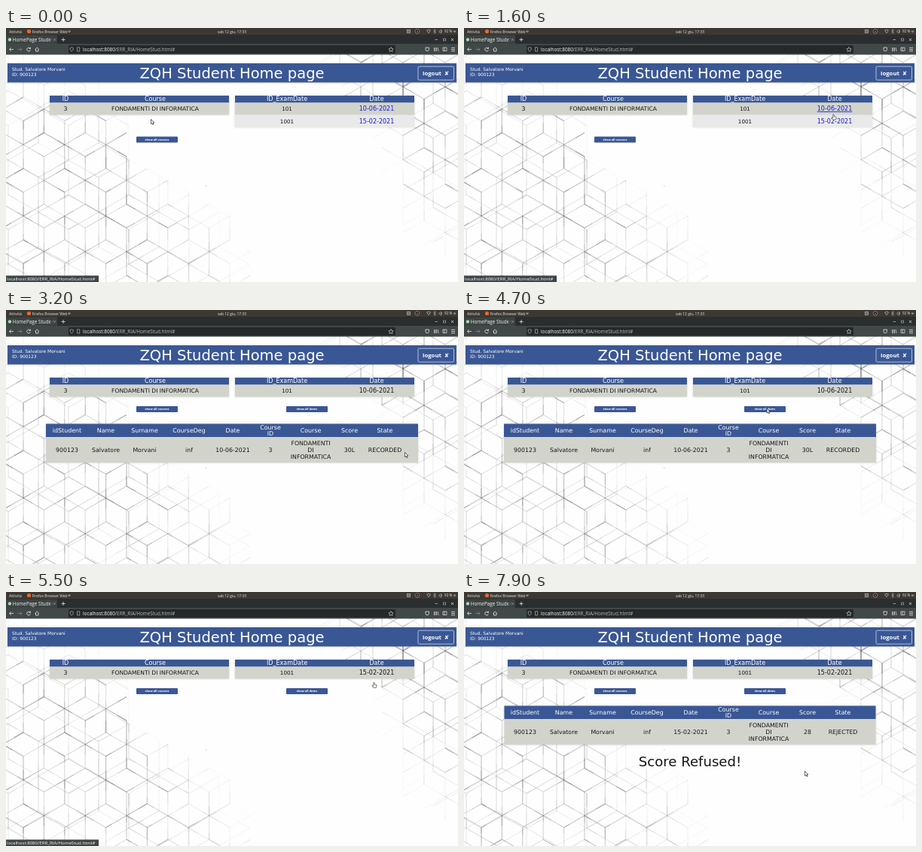
Write an HTML page that moves like this. It is 600 by 338 pixels and loops after 8 s.

```html
<!DOCTYPE html>
<html lang="it">
<head>
<meta charset="utf-8">
<title>Student Home page</title>
<style>
html, body { margin: 0; width: 100%; height: 100%; overflow: hidden; background: #fff; }
svg { display: block; width: 100vw; height: 100vh; }
text { font-family: "DejaVu Sans", sans-serif; }
.ui text, text.ui { font-family: "Open Sans", "Noto Sans", sans-serif; }
.panel { filter: drop-shadow(0 0 1.5px rgba(0, 0, 0, .16)); }
</style>
</head>
<body>
<svg id="stage" viewBox="0 0 600 338" preserveAspectRatio="none"></svg>
<script>
const LOOP = 8000, STEP = 100;
const BLUE = '#3a5795', ROW = '#d2d4cc', ROW2 = '#e9e9e9', INK = '#161616', LINK = '#1a1ad8';
const FIRST = 'Salvatore', LAST = 'Morvani', STUDENT = '900123';
const URL_HOST = 'localhost:8080', URL_PATH = '/ERR_RIA/HomeStud.html#';

const rect = (x, y, w, h, fill, more = '') =>
  `<rect x="${x}" y="${y}" width="${w}" height="${h}" fill="${fill}" ${more}/>`;
const text = (s, x, y, size, fill = INK, more = '') =>
  `<text x="${x}" y="${y}" font-size="${size}" fill="${fill}" ${more}>${s}</text>`;
const mid = (s, x, y, size, fill, more = '') =>
  text(s, x, y, size, fill, 'text-anchor="middle" ' + more);
const line = (d, stroke, width = 0.8, more = '') =>
  `<path d="${d}" fill="none" stroke="${stroke}" stroke-width="${width}" ${more}/>`;
const group = (id, body, more = '') => `<g id="${id}" ${more}>${body}</g>`;
const clamp = v => Math.max(0, Math.min(1, v));

// Linear interpolation through [key, value, ...] points; returns the values.
function along(points, k) {
  let i = 0;
  while (i < points.length - 2 && points[i + 1][0] <= k) i++;
  const a = points[i], b = points[i + 1];
  const u = clamp((k - a[0]) / (b[0] - a[0]));
  return a.slice(1).map((v, j) => v + (b[j + 1] - v) * u);
}

function seeded(seed) {
  return () => (seed = (seed * 16807) % 2147483647) / 2147483647;
}

// A lattice of isometric cubes; fade(x, y) gives its strength at a place.
function cubes(x0, y0, half, seed, fade) {
  const rnd = seeded(seed), edge = half / Math.cos(Math.PI / 6);
  let out = '';
  const stroke = (x1, y1, x2, y2) => {
    const f = fade((x1 + x2) / 2, (y1 + y2) / 2);
    const tone = 0.16 + 0.24 * rnd(), width = 0.8 + 0.7 * rnd(), stub = 0.2 + 0.3 * rnd();
    const flip = rnd() < 0.5;
    if (f <= 0.02) return;
    const [ax, ay, bx, by] = flip ? [x2, y2, x1, y1] : [x1, y1, x2, y2];
    const p = v => v.toFixed(1);
    const d = `M${p(ax)} ${p(ay)}`;
    out += line(`${d}L${p(bx)} ${p(by)}`, '#555', p(width), `opacity="${(tone * f).toFixed(2)}"`);
    out += line(`${d}L${p(ax + (bx - ax) * stub)} ${p(ay + (by - ay) * stub)}`, '#444', p(width),
      `opacity="${(tone * f * 0.7).toFixed(2)}"`);
  };
  for (let r = -1; r < 9; r++) {
    for (let c = -1; c < 13; c++) {
      const x = x0 + (2 * c + (r & 1)) * half, y = y0 + r * 1.5 * edge;
      const l = x - half, q = x + half, up = y - edge / 2, dn = y + edge / 2;
      stroke(l, up, x, y - edge);
      stroke(x, y - edge, q, up);
      stroke(l, up, l, dn);
      stroke(x, y, l, up);
      stroke(x, y, q, up);
      stroke(x, y, x, y + edge);
    }
  }
  return out;
}

function backdrop() {
  const leftTop = [[0, 30], [100, 62], [155, 88], [170, 165], [240, 212], [300, 240], [330, 330]];
  const rightSide = [[37, 415], [90, 430], [130, 500], [200, 512], [260, 525], [320, 600]];
  const left = (x, y) => x > 332 ? 0 : clamp((y - along(leftTop, x)[0]) / 70) * clamp((370 - x) / 190);
  const right = (x, y) => clamp((x - along(rightSide, y)[0]) / 50) * clamp((310 - y) / 120);
  return rect(0, 35, 600, 303, '#fefefe') +
    cubes(23, 28.7, 27.4, 71, left) +
    `<g opacity=".45">${cubes(3, -9, 40, 19, left)}</g>` +
    cubes(415, 46, 28, 43, right) +
    `<g opacity=".55">${cubes(407, 7.8, 40, 97, right)}</g>` +
    rect(265, 209.5, 1.5, 1, '#bbb');
}

function browser() {
  const W = '#e8e6e3', G = '#b5b4b4', TAB = '#3c4343';
  let s = rect(0, 0, 600, 9, '#3d3932') + rect(0, 9, 600, 12.5, '#2a2e2e') +
    rect(0, 9.5, 68, 12, TAB) + rect(0, 21, 600, 14.5, '#414848') +
    rect(83, 23, 434, 11, '#25292a', 'rx="1.5"');
  // system bar
  s += text('Attività', 4, 6.6, 5.2, W) +
    '<circle cx="30.5" cy="4.5" r="2.6" fill="#e8692c"/>' +
    text('Firefox Browser Web', 34.5, 6.6, 4.9, W) + line('M82.5 4h3l-1.5 2z', W, 0.5) +
    mid('sab 12 giu, 17:33', 300, 6.5, 4.9, W) +
    rect(532.5, 2.5, 4, 4, 'none', `stroke="${G}" stroke-width=".8"`) +
    line('M534.5 2.5v4M532.5 4.5h4', G, 0.5) +
    '<circle cx="546" cy="4.5" r="2.8" fill="#151515" stroke="#ddd" stroke-width=".5"/>' +
    '<circle cx="546" cy="4.8" r="1.3" fill="#d33"/>' +
    line('M558.5 3.2q2.5 -2 5 0l-2.5 3.5z', G, 0.8) +
    line('M567.5 3l3 3l-1.5 1.5v-6l1.5 1.5l-3 3', G, 0.6) +
    line('M575 3.7h1l1.5 -1.5v5l-1.5 -1.5h-1zM578.5 3v3', G, 0.6) +
    text('92 %', 582, 6.4, 4.6, W) + line('M594 4h3l-1.5 2z', W, 0.5);
  // tab strip
  s += '<circle cx="5" cy="15.5" r="2.2" fill="#a5d8ad"/>' +
    text('HomePage Studen', 8.8, 17.6, 6.4, '#f3f3f5') +
    rect(59, 10, 9, 11, TAB, 'opacity=".8"') +
    line('M63.5 14.2l2.6 2.6m0 -2.6l-2.6 2.6', G, 0.6) +
    line('M73.5 15.5h5M76 13v5', W) +
    line('M569.5 15.5h3.5', G) + line('M580.5 14h3v3h-3z', G, 0.7) +
    line('M591 14l3 3m0 -3l-3 3', W);
  // toolbar
  s += line('M10 28.5h-5.5l2.3 -2.3m-2.3 2.3l2.3 2.3', W) +
    line('M15.5 28.5h5.5l-2.3 -2.3m2.3 2.3l-2.3 2.3', '#858888') +
    line('M32 27a2.4 2.4 0 1 0 .4 2.3M32.5 25.5v2h-2', W) +
    line('M38.5 28.5l2.7 -2.5l2.7 2.5M39.5 28v3h3.4v-3', W) +
    line('M85 26.5l2.2 -.8l2.2 .8q0 3.5 -2.2 4.8q-2.2 -1.3 -2.2 -4.8z', G, 0.7) +
    line('M94.5 25.8h3.2v5.2h-3.2z', G, 0.7) +
    `<text x="102" y="30.8" font-size="6.35" fill="#b9bbbb"><tspan fill="#fafafc">${URL_HOST}</tspan>${URL_PATH}</text>` +
    line('M511 25.5l1 2l2.1 .3l-1.5 1.5l.4 2.1l-2 -1l-2 1l.4 -2.1l-1.5 -1.5l2.1 -.3z', W, 0.6) +
    line('M557 26v2.5a2.2 2.2 0 0 0 4.4 0v-2.5z', W, 0.8) +
    line('M568.5 26v5M570 26v5M571.5 26v5M573 26l1.2 5', W, 0.7) +
    line('M580 26h5v4.5h-5zM582 26v4.5', W, 0.7) +
    line('M591 26.3h5M591 28.5h5M591 30.7h5', W, 0.8);
  return `<g class="ui">${s}</g>`;
}

function banner() {
  return `<g class="panel">${rect(2, 47, 596, 25.5, BLUE)}</g>` +
    text(`Stud. ${FIRST} ${LAST}`, 8, 57.3, 5.9, '#fff') +
    text(`ID: ${STUDENT}`, 8, 64, 5.9, '#fff') +
    mid('ZQH Student Home page', 300, 66.5, 19.5, '#fff') +
    rect(547, 51.2, 47.5, 18, BLUE, 'rx="1.5" stroke="#fff" stroke-width=".6"') +
    `<g class="ui">${text('logout', 553, 62.7, 7.8, '#fff', 'font-weight="700"')}</g>` +
    mid('✘', 585, 62.7, 7.6, '#fff');
}

const listHead = (x, a, ax, b, bx) => rect(x, 90, 238, 9.2, BLUE) +
  mid(a, ax, 97.4, 8, '#fff') + mid(b, bx, 97.4, 8, '#fff');

const button = (label, x, y) => rect(x, y, 55, 8, BLUE, 'rx="1"') +
  mid(label, x + 27.5, y + 5.4, 3.9, '#fff', 'font-weight="700" class="ui"');

function courses() {
  return `<g class="panel">${rect(58, 90, 238, 25.5, ROW)}</g>` +
    listHead(58, 'ID', 79, 'Course', 198) + mid('3', 79, 110.2, 7.8) +
    mid('FONDAMENTI DI INFORMATICA', 198, 110, 7.6);
}

const examHead = () => listHead(304, 'ID_ExamDate', 373, 'Date', 492);

function allExams() {
  const link = (id, s, y) => mid(s, 492, y, 8, LINK, `id="${id}"`);
  return `<g class="panel">${rect(304, 90, 238, 25.5, ROW)}${rect(304, 115.5, 238, 16.5, ROW2)}</g>` +
    examHead() + mid('101', 373, 110, 7.2) + mid('1001', 373, 126.7, 7.2) +
    link('d1', '10-06-2021', 110) + link('d2', '15-02-2021', 126.7);
}

function oneExam(num, date) {
  return `<g class="panel">${rect(304, 90, 238, 25.5, ROW)}</g>` + examHead() +
    mid(num, 373, 110, 7.2) + mid(date, 492, 110, 8) + button('show all dates', 372, 128);
}

// The wide result table; cx shifts the columns, option adds the button column.
function result(x, w, cx, date, score, state, option) {
  const cols = [81, 132.5, 184, 243, 301, 351, 404.5, 456, 503].map(c => c + cx);
  const heads = ['idStudent', 'Name', 'Surname', 'CourseDeg', 'Date', '', 'Course', 'Score', 'State'];
  const cells = [STUDENT, FIRST, LAST, 'inf', date, '3', '', score, state];
  let s = `<g class="panel">${rect(x, 151.5, w, 51.7, ROW)}</g>` + rect(x, 151.5, w, 17.5, BLUE);
  cols.forEach((c, i) => {
    s += mid(heads[i], c, 163, 7.9, '#fff') + mid(cells[i], c, 188.7, 7.8);
  });
  s += mid('Course', cols[5], 158.6, 7.9, '#fff') + mid('ID', cols[5], 167, 7.9, '#fff');
  ['FONDAMENTI', 'DI', 'INFORMATICA'].forEach((word, i) => {
    s += mid(word, cols[6], 180 + i * 8.8, 7.8);
  });
  if (option) {
    s += mid('option', 538, 163, 7.9, '#fff') +
      rect(524, 181, 29.5, 10.3, '#f00', 'rx="1"') +
      rect(524.8, 181.8, 27.9, 8.7, 'none', 'stroke="#ffb0b0" stroke-width=".4" stroke-dasharray=".7 .7"') +
      mid('Refuse', 538.8, 188.5, 6.4, '#fff', 'font-weight="700" class="ui"');
  }
  return s;
}

const arrow = '<path d="M0 0V6.2L1.5 4.9L2.5 7.1L3.5 6.6L2.6 4.5H4.4Z" fill="#fff" stroke="#222" stroke-width=".7"/>';
const hand = '<path d="M-.6 .3Q0 -.6 .6 .3V2.6L3.4 3.3Q3.8 5.6 2.8 7H-.9L-2.6 4.2L-1.8 3.6L-.6 4.6Z" fill="#fff" stroke="#222" stroke-width=".6"/>';

const stage = document.getElementById('stage');
stage.innerHTML = backdrop() + browser() + banner() + courses() +
  group('coursesBtn', button('show all courses', 173, 128)) +
  group('all', allExams()) +
  group('exam101', oneExam('101', '10-06-2021')) +
  group('exam1001', oneExam('1001', '15-02-2021')) +
  group('recorded', result(53, 494, 0, '10-06-2021', '30L', 'RECORDED')) +
  group('published', result(40, 520, -12.7, '15-02-2021', '28', 'PUBLISHED', true)) +
  group('rejected', result(53.5, 493, 0, '15-02-2021', '28', 'REJECTED') +
    mid('Score Refused!', 300, 231.5, 18.1)) +
  group('status', rect(0, 329.5, 123, 8.5, '#3f4545') +
    text(URL_HOST + URL_PATH, 1, 336, 6.1, '#fbfbfe'), 'class="ui"') +
  group('cursor', group('arrow', arrow) + group('hand', hand));

const el = {};
stage.querySelectorAll('[id]').forEach(n => { el[n.id] = n; });

const path = [
  [0, 192.5, 121.5], [400, 330, 121], [800, 481, 127], [900, 485.5, 128.5],
  [1100, 496, 124], [1400, 505, 111], [1800, 476, 119], [1900, 487.5, 110.5],
  [2000, 487.5, 110.5], [2100, 488.5, 105], [2500, 488.5, 105], [2900, 521, 174],
  [3200, 529.5, 189.5], [3500, 102, 184], [3800, 176, 178], [4200, 498, 176],
  [4500, 428, 114], [4700, 402, 131], [5000, 402, 131], [5200, 487, 119],
  [5300, 488.5, 119], [5600, 488.5, 121], [5900, 61, 182], [6200, 558, 214],
  [6400, 538.5, 192], [6600, 538, 188], [7400, 538, 188], [7600, 238, 228],
  [7700, 300, 262], [7900, 452.5, 238.5], [8000, 452.5, 238.5]
];

const show = (id, on) => el[id].setAttribute('display', on ? 'inline' : 'none');

function draw(ms) {
  const t = Math.floor(ms / STEP) * STEP;
  const within = (...spans) => spans.some(([a, b]) => t >= a && t < b);
  const listed = within([0, 2100], [5000, 5500]);

  show('all', listed);
  show('exam101', within([2100, 5000]));
  show('exam1001', t >= 5500);
  show('recorded', within([2500, 5000]));
  show('published', within([5600, 6700]));
  show('rejected', t >= 6700);
  el.coursesBtn.setAttribute('transform', `translate(0 ${listed ? 16.4 : 0})`);

  const pressed = within([5200, 5500]);
  el.d1.setAttribute('text-decoration', within([1400, 2100]) ? 'underline' : 'none');
  el.d2.setAttribute('text-decoration', within([800, 1200]) || pressed ? 'underline' : 'none');
  el.d2.setAttribute('fill', pressed ? '#e01010' : LINK);

  show('status', within([0, 100], [800, 1200], [1500, 2400], [5400, 5600]));
  el.status.setAttribute('opacity', t === 2300 ? 0.55 : 1);

  const pointing = within([1000, 1200], [1400, 2500], [5200, 5600]);
  show('hand', pointing);
  show('arrow', !pointing);
  el.cursor.setAttribute('transform', `translate(${along(path, t).join(' ')})`);
}

const start = performance.now();
function tick() {
  draw((performance.now() - start) % LOOP);
  requestAnimationFrame(tick);
}
tick();
</script>
</body>
</html>
```
